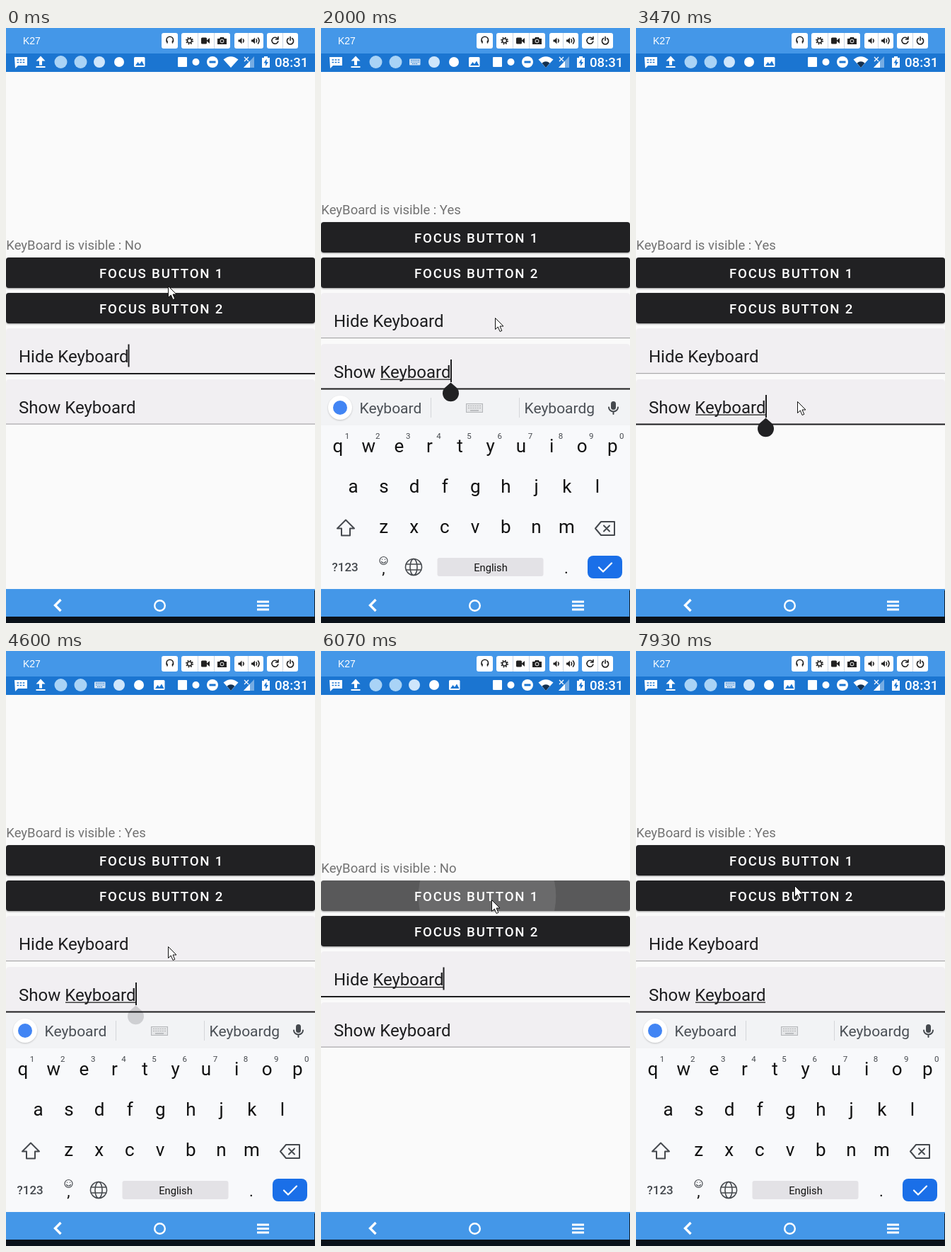
An HTML page for the animation above (8 s loop, 437 px wide and 840 px high).

```html
<!DOCTYPE html>
<html lang="en">
<head>
<meta charset="utf-8">
<title>Keyboard focus demo</title>
<style>
  html, body { margin: 0; height: 100%; overflow: hidden; background: #fafafa; }
  svg { display: block; width: 100vw; height: 100vh; }
  text { font-family: Roboto, sans-serif; white-space: pre; }
  .line { fill: none; stroke-linecap: round; stroke-linejoin: round; }
  .btn { fill: #212123; filter: drop-shadow(0 1.5px 1.2px #0006); }
  .cap { font-size: 18.67px; font-weight: 500; letter-spacing: 1.78px; fill: #fff; }
  .entry { font-size: 24px; fill: #1d1d1f; }
  .hint { font-size: 21px; fill: #4b5056; }
  .key { font-size: 26px; fill: #111; text-anchor: middle; }
  .digit { font-size: 11.5px; fill: #44484d; text-anchor: middle; }
</style>
</head>
<body>
<svg viewBox="0 0 437 840" preserveAspectRatio="none">
  <defs>
    <clipPath id="button1"><rect y="324" width="437" height="43" rx="4"/></clipPath>
    <clipPath id="button2"><rect y="374" width="437" height="43" rx="4"/></clipPath>
  </defs>
  <rect width="437" height="840" fill="#fafafa"/>

  <g id="content">
    <text id="label" x="0.3" y="313" font-size="18.5" fill="#727272"></text>
    <rect class="btn" y="324" width="437" height="43" rx="4"/>
    <rect class="btn" y="374" width="437" height="43" rx="4"/>
    <g id="ripple1" clip-path="url(#button1)" fill="#fff">
      <rect y="324" width="437" height="43" opacity=".25"/><circle cx="235" cy="346" opacity=".1"/>
    </g>
    <g id="ripple2" clip-path="url(#button2)" fill="#fff">
      <rect y="374" width="437" height="43" opacity=".29"/><circle cx="229" cy="396" opacity=".12"/>
    </g>
    <text class="cap" x="132" y="353">FOCUS BUTTON 1</text>
    <text class="cap" x="132" y="403">FOCUS BUTTON 2</text>
    <path d="M0 488V429q0-5 5-5H432q5 0 5 5V488z M0 559.500V501q0-5 5-5H432q5 0 5 5V559.500z" fill="#f1eff2"/>
    <rect id="hideLine" width="437"/>
    <rect id="showLine" width="437"/>
    <text class="entry" x="18" y="472">Hide Keyboard</text>
    <text class="entry" x="18" y="543.5">Show Keyboard</text>
    <rect id="hideMark" x="74" y="474" width="99" height="1.3" fill="#222"/>
    <rect id="showMark" x="84" y="545.5" width="99" height="1.3" fill="#222"/>
    <rect id="caret" width="2" height="32" fill="#1d1d1f"/>
  </g>

  <g id="keyboard">
    <rect y="511" width="437" height="281" fill="#f8f9fb"/>
    <rect y="511" width="437" height="50" fill="#f2f3f5"/>
    <circle cx="27" cy="536" r="17" fill="#fff" style="filter:drop-shadow(0 1px 1px #0003)"/>
    <circle cx="27" cy="536" r="10" fill="#4285f4"/>
    <text class="hint" x="54.500" y="543.500">Keyboard</text>
    <text class="hint" x="287.500" y="543.500">Keyboardg</text>
    <path d="M155.500 522v28M280.500 522v28" stroke="#d4d6d9"/>
    <rect x="205.500" y="530.500" width="23" height="12" fill="#e4e5e7" stroke="#b4b6b9"/>
    <path d="M208 533.500h18M208 536.500h18" stroke="#aeb0b3" stroke-dasharray="2 1.200"/>
    <path d="M211 540h12" stroke="#aeb0b3" stroke-width="1.500"/>
    <rect x="410" y="527" width="7" height="12" rx="3.500" fill="#45494e"/>
    <path class="line" d="M407 535.500a6.500 6 0 0 0 13 0M413.500 542v3" stroke="#45494e" stroke-width="2"/>
    <g id="keys"></g>
    <g class="line" stroke="#45494e" stroke-width="2">
      <path d="M35 694.500L23 706.500h6v10h12v-10h6z"/>
      <path d="M396 697h19v19h-19l-8-9.500zM400 702.500l8 8M408 702.500l-8 8"/>
      <g stroke-width="1.600">
        <circle cx="131" cy="761" r="11.500"/><ellipse cx="131" cy="761" rx="5" ry="11.500"/>
        <path d="M120.500 757h21M120.500 765h21"/>
      </g>
      <g stroke-width="1.200"><circle cx="88.500" cy="752" r="5.500"/><path d="M85.500 753.500q3 3.500 6 0M86.500 750v.3M90.500 750v.3"/></g>
    </g>
    <text x="15.500" y="767" font-size="17" font-weight="500" fill="#45494e">?123</text>
    <text class="key" x="88.500" y="770" style="font-size:22px">,</text>
    <rect x="164.500" y="748" width="150" height="26" rx="3" fill="#e3e2e6"/>
    <text x="240" y="767" font-size="14.700" text-anchor="middle" fill="#111">English</text>
    <text class="key" x="347" y="770" style="font-size:22px">.</text>
    <rect x="377" y="745" width="49" height="32" rx="8" fill="#1a6fe8"/>
    <path class="line" d="M393 761.500l6 6 12-12" stroke="#fff" stroke-width="2.200"/>
  </g>
  <path id="handle" d="M183.500 550.500L192 558A11.500 11.500 0 1 1 175 558z" fill="#212123"/>

  <!-- window toolbar -->
  <rect width="437" height="36" fill="#4497e8"/>
  <text x="24" y="23" fill="#fff" style="font:14px 'Liberation Sans',Arial,sans-serif">K27</text>
  <g fill="#fff">
    <rect x="220" y="7" width="23" height="22" rx="3"/><rect x="248" y="7" width="69" height="22" rx="3"/>
    <rect x="323" y="7" width="41" height="22" rx="3"/><rect x="369" y="7" width="44" height="22" rx="3"/>
  </g>
  <path d="M271.500 7v22M294.500 7v22M342.500 7v22M391.500 7v22" stroke="#c9d6e4"/>
  <g class="line" stroke="#222" stroke-width="1.600">
    <path d="M227 19v-2a4.700 4.700 0 0 1 9.500 0v2M228 18.500v2.500M235.500 18.500v2.500"/>
    <circle cx="259.500" cy="18" r="3"/>
    <circle cx="259.500" cy="18" r="4.600" stroke-dasharray="1.800 1.810" stroke-linecap="butt"/>
    <path d="M335.500 16q1.500 2 0 4M354 16q1.500 2 0 4M356.500 14q3 4 0 8"/>
    <path d="M384 15a4.500 4.500 0 1 0 .8 4M385 12.500v3.500h-3.500"/>
    <path d="M399.500 14.500a4.600 4.600 0 1 0 5 0M402 12.500v5"/>
  </g>
  <g fill="#222">
    <rect x="276" y="13.500" width="8" height="9" rx="1.500"/><path d="M284 17.500l4-3.500v8l-4-3.500z"/>
    <path d="M299 15h3l1-2h5l1 2h3v8h-13z"/>
    <path d="M328.500 16.500h2l3-3v9l-3-3h-2zM347 16.500h2l3-3v9l-3-3h-2z"/>
  </g>
  <circle cx="305.500" cy="18.500" r="2.400" fill="#222" stroke="#fff"/>

  <!-- phone status bar -->
  <rect y="36" width="437" height="26" fill="#1b75d1"/>
  <g fill="#fff">
    <path d="M12 41h18v12H17l-4 4z"/>
    <path d="M15.500 45h11M15.500 48.500h11" stroke="#1b75d1" stroke-width="1.400" stroke-dasharray="2.600 1.500"/>
    <path d="M49 39.500l6.500 7H51v6h-4v-6h-4.500zM42.500 54h13v2h-13z"/>
    <circle cx="77.500" cy="48" r="9" fill="#a9d3f6"/><circle cx="105.500" cy="48" r="9" fill="#a9d3f6"/>
    <g id="notifications">
      <circle cx="132" cy="48" r="8" fill="#cfe6fb"/>
      <circle cx="160" cy="48" r="7"/>
      <rect x="181" y="41" width="15.500" height="14" rx="1.500"/>
      <path d="M183 53l3.500-5 2.500 3 3-4.500 3.500 6.500z" fill="#1b75d1"/>
    </g>
    <g id="imeIcon" opacity=".8">
      <rect x="125" y="43.500" width="15.500" height="9" rx="1"/>
      <path d="M127 45.500h12M127 48h12M129 50.500h8" stroke="#1b75d1" stroke-dasharray="1.600 1"/>
    </g>
    <rect x="243" y="41" width="13" height="14" rx="1"/>
    <circle cx="268.500" cy="48" r="5"/>
    <circle cx="292" cy="48" r="8"/><rect x="287.500" y="46.500" width="9" height="3" fill="#1b75d1"/>
    <path d="M307.500 44.500q10.500-8.500 21 0L318 56z"/>
    <path id="wifiBusy" d="M312.500 49.500q5.500-4.500 11 0L318 56z" fill="#14304f"/>
    <path d="M351 40v16h-15z" opacity=".4"/><path d="M345 46.500v9.500h-9z"/>
    <path d="M337 41l6 6M343 41l-6 6" stroke="#fff" stroke-width="1.300"/>
    <path d="M362 42h3v-2h5v2h3v14h-11z"/><path d="M368.500 43.500l-4 6h2.500v4.500l4-6h-2.500z" fill="#1b75d1"/>
    <text x="380" y="55" font-size="18.670" font-weight="500">08:31</text>
  </g>

  <!-- navigation bar -->
  <rect y="792" width="437" height="39" fill="#4497e8"/>
  <rect y="831" width="437" height="9" fill="#0a1119"/>
  <rect x="436" y="794" width="1" height="37" fill="#14202c"/>
  <g fill="none" stroke="#fff">
    <path d="M77.500 807l-8 8 8 8" stroke-width="3.400"/>
    <circle cx="217.500" cy="815.500" r="7.300" stroke-width="2.400"/>
    <path d="M355 810h17M355 815.500h17M355 821h17" stroke-width="3"/>
  </g>

  <path id="pointer" d="M.5.500v16l3.800-3.500 2.800 6.500 2.700-1.200-2.800-6.300h5z" fill="#fff" stroke="#111"/>
</svg>

<script>
const LOOP = 8000;
const el = Object.fromEntries([...document.querySelectorAll('[id]')].map(e => [e.id, e]));
const clamp = v => Math.min(1, Math.max(0, v));
const ramp = (t, start, length) => clamp((t - start) / length);
const ease = v => 1 - (1 - v) ** 2;
const within = (t, spans) => spans.some(([a, b]) => t >= a && t < b);
const set = (e, attrs) => { for (const k in attrs) e.setAttribute(k, attrs[k]); };
const show = (e, on) => set(e, { visibility: on ? 'visible' : 'hidden' });

const PITCH = 43.15;
const keyRow = (letters, x, y, cls) => [...letters].map((c, i) =>
  `<text class="${cls}" x="${x + i * PITCH}" y="${y}">${c}</text>`).join('');
el.keys.innerHTML = keyRow('qwertyuiop', 24, 599, 'key') + keyRow('1234567890', 37, 580, 'digit')
  + keyRow('asdfghjkl', 45.7, 656, 'key') + keyRow('zxcvbnm', 88.6, 713, 'key');

// time, x, y of the mouse pointer
const POINTER = [
  [65, 229, 364], [200, 247, 511], [440, 247, 511], [600, 247, 529], [1350, 247, 529],
  [1800, 246, 409], [2350, 246, 409], [2800, 237, 531], [2930, 228, 527], [3560, 228, 527],
  [4070, 230, 432], [4200, 229, 417], [4860, 229, 417], [5200, 236, 400], [5400, 241, 351],
  [7000, 241, 351], [7170, 233, 389], [7500, 233, 389], [7800, 228, 363], [7930, 224, 331]
];
const CARET_RESETS = [-370, 990, 2400, 3400, 4800, 6170, 7250];
const SHOW_FOCUSED = [[990, 2400], [3400, 4800], [7250, LOOP]];
const HIDE_COMPOSING = [[2400, 3400], [4800, 6200]];
const WIFI_BUSY = [[1000, 6300], [7500, LOOP]];

function pointerAt(t) {
  const i = POINTER.findIndex(p => p[0] > t);
  if (i === 0) return POINTER[0].slice(1);
  if (i < 0) return POINTER.at(-1).slice(1);
  const [a, b] = [POINTER[i - 1], POINTER[i]];
  const f = ramp(t, a[0], b[0] - a[0]);
  return [a[1] + (b[1] - a[1]) * f, a[2] + (b[2] - a[2]) * f];
}

function keyboardAt(t) {
  const step = start => ease(ramp(t, start, 220));
  return step(1200) - step(2430) + step(3600) - step(4830) + step(7450);
}

function drawRipple(group, age) {
  show(group, age > 0 && age < 500);
  group.lastElementChild.setAttribute('r', Math.max(0, age * 0.69));
  group.setAttribute('opacity', clamp(age / 90) * (1 - ramp(age, 270, 230)));
}

function drawLine(line, bottom, focused) {
  set(line, focused ? { y: bottom - 0.5, height: 2, fill: '#1d1d1f' } : { y: bottom - 0.5, height: 1.2, fill: '#a9a8aa' });
}

function draw(t) {
  const onShow = within(t, SHOW_FOCUSED);
  const open = keyboardAt(t);
  const pan = -50 * open;
  const flash = 0.5 * Math.sin(Math.PI * ramp(t, 6200, 220));
  const visible = Math.max(open, flash);

  el.label.textContent = 'KeyBoard is visible : ' + (onShow ? 'Yes' : 'No');
  set(el.content, { transform: `translate(0 ${pan})` });
  drawLine(el.hideLine, 487.5, !onShow);
  drawLine(el.showLine, 559, onShow);
  show(el.hideMark, within(t, HIDE_COMPOSING));
  show(el.showMark, onShow);

  const reset = CARET_RESETS.filter(r => r <= t).at(-1);
  show(el.caret, Math.floor((t - reset) / 500) % 2 === 0);
  set(el.caret, onShow ? { x: 183, y: 518 } : { x: 172.5, y: 446.5 });

  drawRipple(el.ripple1, t - 5930);
  drawRipple(el.ripple2, t - 7204);

  show(el.keyboard, visible > 0.001);
  set(el.keyboard, { opacity: visible, transform: `translate(0 ${80 * (1 - visible)})` });
  show(el.imeIcon, open > 0.5);
  set(el.notifications, { transform: `translate(${open > 0.5 ? 28 : 0} 0)` });
  show(el.wifiBusy, within(t, WIFI_BUSY));

  const handle = t < 3000 ? (t >= 990) * (1 - ramp(t, 2120, 100)) : (t >= 3400) * (1 - ramp(t, 4518, 100));
  set(el.handle, { opacity: handle, transform: `translate(0 ${pan})` });
  set(el.pointer, { transform: `translate(${pointerAt(t).map(Math.round).join(' ')})` });
}

function tick() {
  draw(performance.now() % LOOP);
  requestAnimationFrame(tick);
}
tick();
</script>
</body>
</html>
```
